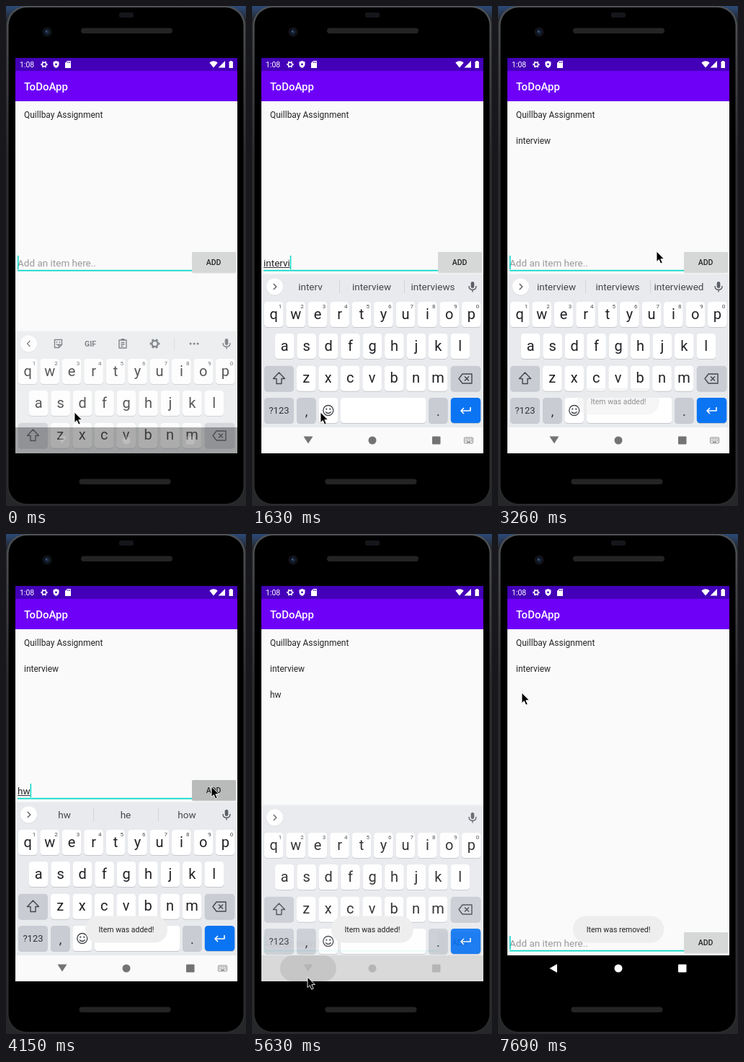
Animation of 333x693 px, one loop 7990 ms. Source, as an HTML page:

```html
<!DOCTYPE html>
<html lang="en">
<head>
<meta charset="utf-8">
<title>ToDoApp</title>
<style>
  html, body { margin: 0; width: 100%; height: 100%; overflow: hidden; background: #000; }
  svg { display: block; width: 333px; height: 693px; font-family: Roboto, sans-serif; }
</style>
</head>
<body>
<svg id="stage" viewBox="0 0 333 693"></svg>
<script>
const LOOP = 7990;
const TEAL = '#03d8c6', INK = '#252525', ICON = '#5c6066';

const ticks = [[0, 150, 2], [750, 1770, 8], [1920, 2510, 5], [2960, 4000, 8],
  [4150, 5190, 8], [5490, 6510, 8], [6960, 7690, 6]].flatMap(([first, last, count]) =>
  Array.from({ length: count }, (_, i) =>
    Math.floor((first + (last - first) * i / (count - 1)) / 10 + 1e-6) * 10));

const pointerPath = [[0, 95, 563], [1910, 95, 563], [2360, 270, 330], [2510, 285, 350],
  [3100, 285, 350], [3250, 220, 340], [3400, 200, 337], [3850, 200, 337], [4150, 285, 350],
  [4440, 285, 350], [4890, 95, 660], [5190, 77, 614], [5920, 77, 614], [6510, 33, 220],
  [LOOP, 33, 220]];

const changes = [
  [0, { items: ['Quillbay Assignment'], typed: '', caret: true, editY: 0, pressed: false,
        bar: 'tools', words: [], slide: 79, keysAlpha: .75, nav: 'fade',
        toast: 'Item was added!', toastAlpha: 0 }],
  [150, { slide: 0, keysAlpha: 1, nav: 'light', caret: false }],
  [740, { caret: true }],
  [2200, { words: ['interview', 'interviews', 'interviewed'] }],
  [2960, { pressed: true }],
  [3100, { pressed: false, typed: '', items: ['Quillbay Assignment', 'interview'], toastAlpha: .15 }],
  [3250, { toastAlpha: .5 }],
  [3400, { toastAlpha: 1, bar: 'tools' }],
  [3700, { typed: 'h' }],
  [3850, { typed: 'hw', bar: 'words', words: ['h', 'how', 'he'] }],
  [4000, { words: ['hw', 'he', 'how'] }],
  [4150, { pressed: true }],
  [4290, { pressed: false, typed: '', items: ['Quillbay Assignment', 'interview', 'hw'] }],
  [4440, { bar: 'tools' }],
  [5490, { nav: 'ripple' }],
  [5630, { nav: 'closing', bar: 'bare', slide: 4, keysAlpha: .9, editY: 211 }],
  [5780, { nav: 'fade', slide: 110, keysAlpha: .6 }],
  [5920, { nav: 'dark', keysAlpha: 0 }],
  [6210, { toastAlpha: .5 }],
  [6350, { toastAlpha: 0, caret: false }],
  [6960, { caret: true }],
  [7100, { items: ['Quillbay Assignment', 'interview'] }],
  [7250, { toast: 'Item was removed!', toastAlpha: .5 }],
  [7400, { toastAlpha: 1, caret: false }],
  [7690, { caret: true }]
];

// Typing "interview"; suggestions trail one keystroke behind.
const guesses = ['in is', 'inside into', 'into interest', 'interest internet',
  'interview internet', 'interview interviews', 'interview interviews'];
const keystroke = n => 740 + 145 * n;
for (let n = 1; n <= 9; n++)
  changes.push([keystroke(n - 1 + (n > 7)), { typed: 'interview'.slice(0, n) }]);
guesses.forEach((guess, i) => changes.push([keystroke(i + 1),
  { bar: 'words', words: ['interview'.slice(0, i + 1), ...guess.split(' ')] }]));
changes.sort((a, b) => a[0] - b[0]);

function pointerAt(t) {
  const i = pointerPath.findIndex(p => p[0] > t);
  const [t0, x0, y0] = pointerPath[i - 1], [t1, x1, y1] = pointerPath[i];
  const u = (t - t0) / (t1 - t0), e = u * u * (3 - 2 * u);
  return [x0 + (x1 - x0) * e, y0 + (y1 - y0) * e];
}

const rect = (x, y, w, h, fill, rx = 0, more = '') =>
  `<rect x="${x}" y="${y}" width="${w}" height="${h}" rx="${rx}" fill="${fill}" ${more}/>`;
const circle = (x, y, r, fill, more = '') => `<circle cx="${x}" cy="${y}" r="${r}" fill="${fill}" ${more}/>`;
const text = (x, y, size, str, fill = INK, more = '') =>
  `<text x="${x}" y="${y}" font-size="${size}" fill="${fill}" ${more}>${str}</text>`;
const label = (x, y, size, str, fill, more = '') => text(x, y, size, str, fill, 'text-anchor="middle" ' + more);
const shape = (d, fill, more = '') => `<path d="${d}" fill="${fill}" ${more}/>`;
const line = (d, color = ICON, width = 1.4) =>
  shape(d, 'none', `stroke="${color}" stroke-width="${width}" stroke-linejoin="round"`);
const group = (x, y, body, alpha = 1) => `<g transform="translate(${x} ${y})" opacity="${alpha}">${body}</g>`;

const gear = (x, y, r, color) => group(x, y,
  circle(0, 0, r * .58, 'none', `stroke="${color}" stroke-width="${r * .32}"`) +
  circle(0, 0, r * .84, 'none', `stroke="${color}" stroke-width="${r * .28}" pathLength="12" stroke-dasharray="1" stroke-dashoffset=".5"`));

const gradient = (id, from, to, end) =>
  `<linearGradient id="${id}" x2="0" y2="1"><stop stop-color="${from}"/><stop offset="${end}" stop-color="${to}"/></linearGradient>`;

const phone =
  gradient('desk', '#2b4a78', '#262729', .03) + gradient('frame', '#505356', '#2a2b2d', .3) +
  rect(0, 0, 333, 693, 'url(#desk)') +
  rect(1, 0, 331, 692, 'url(#frame)', 27) + rect(3.5, 2, 326, 688, '#000', 25) +
  rect(157, 9, 20, 7, '#14161b', 2) +
  circle(57, 36, 6.5, '#10141b') + circle(57, 36, 2.8, '#1c2b49') + circle(56, 35, .9, '#566a94') +
  [[104, 30.5], [101.5, 655.5]].map(([x, y]) => rect(x, y, 127, 7.5, '#242424', 3.7)).join('');

const header =
  rect(13, 72, 308, 548, '#fafafa') + rect(13, 72, 308, 18, '#4300b8') + rect(13, 90, 308, 42, '#6e00f8') +
  text(19, 85, 10.5, '1:08', '#fff') + gear(53, 81, 4.8, '#fff') +
  shape('M69.5 76l4 1.6v3q0 3.6-4 5.4q-4-1.8-4-5.4v-3z', '#fff') + circle(69.5, 80.8, 1.4, '#4300b8') +
  shape('M82 79l3-3h5v10h-8z', '#fff') + line('M85.3 77v2M87 77v2M88.7 77v2', '#4300b8', .8) +
  shape('M282.3 78.5q5.7-4.5 11.4 0l-5.7 7z', '#fff') + shape('M304 76v9.5h-9.5z', '#fff') +
  shape('M309.5 77h1.5v-1h2.4v1h1.5v9h-5.4z', '#fff') +
  text(25, 117, 15, 'ToDoApp', '#fff', 'font-weight="500"');

function editRow({ typed, caret, editY, pressed }) {
  const entry = typed
    ? text(16, 360.5, 13.5, typed, INK, 'id="entry"') : text(16, 360.5, 13.5, 'Add an item here..', '#999');
  return group(0, editY,
    entry + rect(16, 365.8, 242, 1.7, TEAL) +
    (typed ? rect(16, 362, 0, 1, '#333', 0, 'id="underline"') : '') +
    (caret ? rect(16, 346, 1.5, 19, TEAL, 0, 'id="caret"') : '') +
    rect(258, 342, 61, 28.5, '#e2e2e2', 2) + rect(258, 341, 61, 28.5, pressed ? '#b9baba' : '#d6d7d7', 1.5) +
    label(288, 358.7, 10.5, 'ADD', INK, 'font-weight="500"'));
}

const key = (x, y, w, fill = '#fff') => rect(x, y + 1, w, 35, '#c5c8ce', 4.5) + rect(x, y, w, 35, fill, 4.5);
const letterRow = (letters, x, y) => [...letters].map((c, i) =>
  key(x + 30.45 * i - 13.3, y, 26.6) + label(x + 30.45 * i, y + 23.5, 20, c, '#202124')).join('');

const GREY = '#c9ccd3';
const keys =
  letterRow('qwertyuiop', 30.2, 410) + letterRow('asdfghjkl', 45.2, 454) + letterRow('zxcvbnm', 75.3, 498.7) +
  [...'1234567890'].map((d, i) => label(39 + 30.45 * i, 419, 8, d, '#45484d')).join('') +
  key(17, 498.7, 41, GREY) + line('M37.5 508l-8 8.5h4.5v7h7v-7h4.5z', '#44474c') +
  key(275.8, 498.7, 41.5, GREY) + line('M292 510h13v13h-13l-5-6.5zM295 513.5l6 6m0-6l-6 6', '#44474c') +
  key(17, 543, 41, GREY) + label(37.5, 565, 13, '?123', '#303338') +
  key(62, 543, 26.6, GREY) + label(75.5, 568, 18, ',', '#303338') +
  key(92.5, 543, 26.6) + circle(105.8, 560.5, 7, 'none', `stroke="#44474c" stroke-width="1.4"`) +
  circle(103.3, 558.7, 1.1, '#44474c') + circle(108.3, 558.7, 1.1, '#44474c') + line('M102 562.5q3.8 4 7.6 0', '#44474c') +
  key(123, 543, 118.5) + key(245, 543, 26.6, GREY) + label(258.3, 568, 18, '.', '#303338') +
  key(275.8, 543, 41.5, '#0b74f3') + line('M303 556v5h-13m4-4l-4 4l4 4', '#fff', 1.6);

const mic = rect(303.7, 382, 4.6, 9, ICON, 2.3) + line('M301 388q0 5.3 5 5.3t5-5.3M306 393v3.5');
const tools =
  line('M67.5 383.5h10v7l-4 4h-6zM77.5 390.5h-4v4M70 389.5q2 2.5 4 0') + circle(70.5, 387, .9, ICON) + circle(74.5, 387, .9, ICON) +
  label(117, 393, 10.5, 'GIF', ICON, 'font-weight="700"') +
  line('M157 384h10v11h-10zM159.5 387.5h5m-5 2.5h5m-5 2.5h3') + rect(159.5, 382, 5, 3, ICON, 1) +
  gear(206.5, 389, 7, ICON) + rect(233, 380, 1, 18, '#d2d4d8') +
  [256, 261, 266].map(x => circle(x, 389, 1.5, ICON)).join('');

function suggestionBar({ bar, words }) {
  const arrow = bar === 'tools' ? 'M33.5 385l-4 4l4 4' : 'M29.8 385l4 4l-4 4';
  const middle = { tools, bare: '', words:
    words.map((w, i) => label(81 + 85 * i, 394, 13.5, w, '#44474c')).join('') +
    rect(121, 380, 1, 18, '#d2d4d8') + rect(211, 380, 1, 18, '#d2d4d8') };
  return circle(31.5, 389.8, 11.6, '#d3d5d9') + circle(31.5, 389, 11.5, '#fff') + line(arrow) + middle[bar] + mic;
}

function keyboard(s) {
  const panel = rect(13, 371.5, 308, 260, '#e8eaed') + suggestionBar(s) + keys;
  return `<clipPath id="screen">${rect(13, 132, 308, 488)}</clipPath>` +
    `<g clip-path="url(#screen)">${group(0, s.slide, panel, s.keysAlpha)}</g>`;
}

const navStyles = {
  fade: ['rgba(0,0,0,.32)', 'rgba(255,255,255,.2)'],
  light: ['#fafafa', '#737373'],
  ripple: ['#fafafa', '#737373', '#e0e0e0'],
  closing: ['#d9d9d9', '#b5b5b5', '#c6c6c6'],
  dark: ['#000', '#fff']
};

function navBar(nav) {
  const [back, icon, ripple] = navStyles[nav];
  const open = nav === 'light' || nav === 'ripple';
  const triangle = nav === 'dark' ? 'M71.5 602l10.5-6v12z' : 'M71.5 596.5h13l-6.5 10z';
  const dots = [297, 299.5, 302, 304.5].map(x => rect(x - .8, 599.5, 1.4, 1.4, icon) + rect(x - .8, 602, 1.4, 1.4, icon)).join('');
  return rect(13, 584, 308, 36, back) + (ripple ? rect(39, 584, 78, 36, ripple, 18) : '') +
    shape(triangle, icon) + circle(167, 602, 5.5, icon) + rect(250, 596.5, 11.5, 11, icon, 1) +
    (open ? rect(294.5, 598, 12, 8, 'none', 1, `stroke="${icon}" stroke-width=".8"`) + dots + rect(298, 604, 5, 1, icon) : '');
}

function toastBox({ toast, toastAlpha }) {
  const width = toast.includes('removed') ? 126 : 114;
  return group(167, 0, rect(-width / 2, 529.5, width, 37, '#eeeeee', 18) + label(0, 552, 10.5, toast, '#222'), toastAlpha);
}

const pointer = ([x, y]) => group(x, y,
  shape('M0 0V14.5l3.3-3 2.4 5.6 2.5-1.1-2.4-5.4h4.6z', '#000', 'stroke="#fff" stroke-width=".9"'));

const stage = document.getElementById('stage');

function draw(t) {
  const s = Object.assign({}, ...changes.filter(c => c[0] <= t).map(c => c[1]));
  stage.innerHTML = phone + header +
    s.items.map((item, i) => text(25, 154.5 + 36 * i, 12, item)).join('') +
    editRow(s) + (s.keysAlpha ? keyboard(s) : '') + navBar(s.nav) +
    (s.toastAlpha ? toastBox(s) : '') + pointer(pointerAt(t));
  if (s.typed) {
    const width = document.getElementById('entry').getComputedTextLength();
    document.getElementById('underline').setAttribute('width', width);
    document.getElementById('caret')?.setAttribute('x', 16 + width);
  }
}

let shown = -1;
function play() {
  const now = performance.now() % LOOP;
  const tick = ticks.filter(t => t <= now).pop();
  if (tick !== shown) draw(shown = tick);
  requestAnimationFrame(play);
}
play();
</script>
</body>
</html>
```
